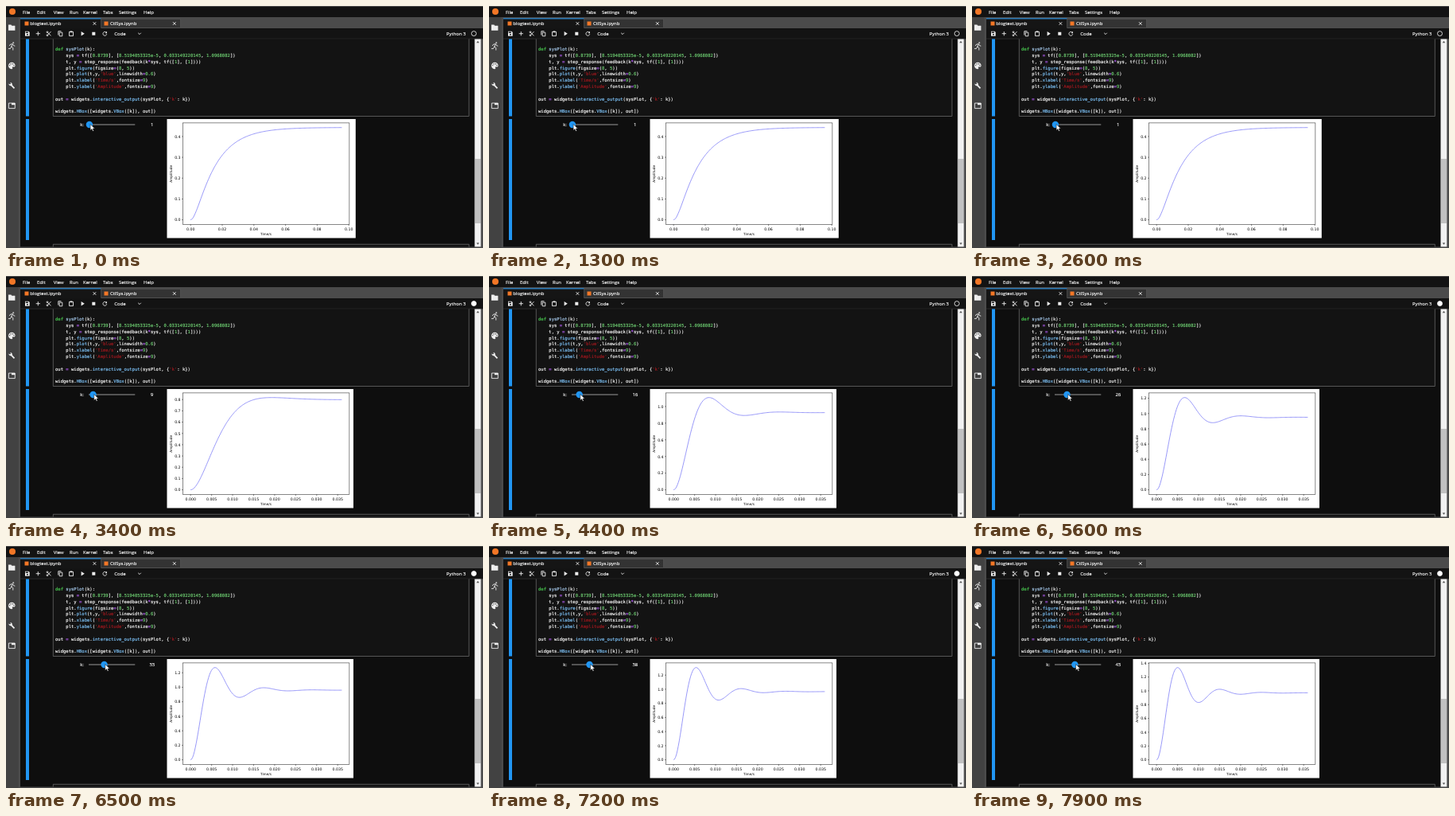
Animation of 600 by 304 pixels, one loop 8000 ms. Source, as an HTML page:

```html
<!DOCTYPE html>
<html lang="en">
<head>
<meta charset="utf-8">
<title>Step response slider</title>
<style>
  html, body { margin: 0; width: 100%; height: 100%; overflow: hidden; background: #111; }
  svg { display: block; width: 100%; height: 100%; }
  text { white-space: pre; fill: currentColor; }
  tspan { fill: currentColor; stroke: currentColor; }
  .ui { font: 5.95px "Open Sans", "Noto Sans", sans-serif; color: #fff; stroke: currentColor; stroke-width: .14; }
  .code { font: 5.545px "DejaVu Sans Mono", "Noto Sans Mono", monospace; color: #f4f4f4; stroke: currentColor; stroke-width: .17; }
  .kw { color: #3fa845; font-weight: bold; }
  .fn { color: #a9cdf0; }
  .prop { color: #7cc0f5; }
  .num { color: #6ccb70; }
  .str { color: #9c181e; }
  .op { color: #b05cf0; }
  .plot { font: 4.7px "DejaVu Sans", sans-serif; color: #000; }
  .label { font-size: 4.25px; }
  .mid { text-anchor: middle; }
  .end { text-anchor: end; }
  .icon { fill: #eee; stroke: none; }
  .line { fill: none; stroke: #eee; stroke-width: .9; }
</style>
</head>
<body>
<svg viewBox="0 0 600 304" preserveAspectRatio="none">
  <rect width="600" height="304" fill="#4b4b4b"/>
  <rect y="1" width="600" height="13" fill="#131313"/>
  <rect y="14" width="15.5" height="290" fill="#424242"/>
  <rect x="18" y="28" width="580" height="274.5" fill="#0e0e0e"/>
  <circle cx="8" cy="7" r="4" fill="#f37726"/>
  <g id="menu" class="ui"></g>

  <!-- side bar -->
  <path class="icon" d="M3 23.5h3.4l1 1.2h4v6H3z"/>
  <g class="line">
    <path d="M8.4 47.8L6.8 51l2 1.6v3M6.8 51L5.4 53.6H3M4.2 50l1.6-2 2.6-.2 1.3 2 1.6.4"/>
    <circle cx="9.2" cy="46.2" r=".6"/>
  </g>
  <path class="icon" d="M7.3 70.7a4.3 4.3 0 1 0 0 8.6c1 0 1.2-.9.7-1.5-.4-.8 0-1.3.8-1.3h1.1c1 0 1.7-.8 1.7-1.8 0-2.2-2-4-4.3-4z"/>
  <g fill="#424242">
    <circle cx="4.7" cy="74.6" r=".7"/><circle cx="6.1" cy="72.7" r=".7"/>
    <circle cx="8.4" cy="72.7" r=".7"/><circle cx="9.9" cy="74.6" r=".7"/>
  </g>
  <path d="M5.7 98.3l4.8 5" stroke="#eee" stroke-width="1.8" fill="none"/>
  <path class="icon" d="M3.4 97.4a2.6 2.6 0 0 0 4.3 2.2 2.6 2.6 0 0 0-2.6-3.6l1.2 1.3-1.2 1.2z"/>
  <path class="line" d="M3.4 122h7.9v6.6H3.4z"/>
  <path class="icon" d="M7 122h4.3v2.2H7z"/>

  <!-- document tabs -->
  <rect x="18" y="16" width="101.5" height="12.5" fill="#151515"/>
  <rect x="18" y="15.4" width="101.5" height="1" fill="#2196f3"/>
  <rect x="119.8" y="16.3" width="99.7" height="11.2" fill="#333" stroke="#616161" stroke-width=".5"/>
  <rect x="23.5" y="19.5" width="5" height="5" fill="#f37726"/>
  <rect x="123.5" y="19.5" width="5" height="5" fill="#f37726"/>
  <text class="ui" x="30.3" y="24.2">blogtest.ipynb</text>
  <text class="ui" x="131" y="24.2">CtlSys.ipynb</text>
  <path class="line" d="M109.6 20.2l3.6 3.6m0-3.6l-3.6 3.6M210 20.2l3.6 3.6m0-3.6l-3.6 3.6"/>

  <!-- toolbar -->
  <rect x="18" y="28" width="582" height="13.3" fill="#131313"/>
  <path d="M18 41.2h580" stroke="#3c3c3c" stroke-width=".6"/>
  <path class="icon" fill-rule="evenodd" d="M24 31.8h4.4l1.3 1.3v4.6H24zM24.7 32.4v1.5h3.2v-1.5zM26.9 35a.9.9 0 1 0 .01 0z"/>
  <path class="line" d="M37.7 34.7h5.2M40.3 32.1v5.2"/>
  <g class="line">
    <path d="M52.5 33.4l4 4M52.5 36.2l4-4"/>
    <circle cx="52" cy="32.8" r=".9"/><circle cx="52" cy="36.8" r=".9"/>
    <path d="M67.2 33.2h3.6v4.6h-3.6zM65.8 36.5v-4.8h3.6"/>
    <path d="M79.5 32.4h5v5.2h-5z"/>
  </g>
  <path class="icon" d="M80.7 31.4h2.6v1.8h-2.6zM94.6 32l4.2 2.7-4.2 2.7zM108.3 32.7h4v4h-4z"/>
  <path class="line" d="M126.2 33.3a2.4 2.4 0 1 0 .5 2"/>
  <path class="icon" d="M127 31.8v2.4h-2.4z"/>
  <text class="ui" x="136.3" y="36.7">Code</text>
  <path class="line" d="M166.2 33.8l1.8 1.8 1.8-1.8"/>
  <text class="ui" x="554" y="36.7">Python 3</text>
  <circle id="kernel" cx="588.5" cy="34.6" r="3" stroke="#fff" stroke-width=".8"/>

  <!-- cells -->
  <rect x="25" y="41.5" width="4" height="97" fill="#2196f3"/>
  <rect x="25" y="142" width="4" height="152" fill="#2196f3"/>
  <path d="M59.3 41.5V138.5H582.3V41.5" fill="#131313" stroke="#747474" stroke-width=".7"/>
  <path d="M59.3 302.5V299.3H582.3V302.5" fill="#131313" stroke="#747474" stroke-width=".7"/>
  <g id="code" class="code"></g>

  <!-- scroll bar -->
  <rect x="589.5" y="41.5" width="8" height="261" fill="#f1f1f1"/>
  <rect x="590" y="192" width="7" height="81" fill="#c1c1c1"/>
  <path d="M591.7 46.3l1.8-2.2 1.8 2.2zM591.7 297.5l1.8 2.2 1.8-2.2z" fill="#505050"/>

  <!-- output -->
  <text class="ui" x="93.2" y="151">k:</text>
  <path d="M104 149h58.3" stroke="#6b6b6b" stroke-width="1.5"/>
  <circle id="knob" cy="149" r="4.2" fill="#2196f3"/>
  <text id="value" class="ui mid" x="183.8" y="151.2"></text>
  <rect id="paper" x="202.5" y="142" height="149.5" fill="#fff"/>
  <g id="ticks" class="plot"></g>
  <path id="curve" fill="none" stroke="#7777f6" stroke-width=".75" stroke-linejoin="round"/>
  <rect x="222.7" y="146.9" width="209.2" height="127.5" fill="none" stroke="#111" stroke-width=".5"/>
  <text class="plot label mid" x="327" y="288">Time/s</text>
  <text class="plot label mid" transform="translate(208.6 210.8) rotate(-90)">Amplitude</text>
  <path id="cursor" d="M0 0v7.6l1.8-1.6 1.2 2.7 1.3-.6-1.2-2.6h2.4z" fill="#fff" stroke="#111" stroke-width=".5"/>
</svg>
<script>
const $ = id => document.getElementById(id);
const LOOP = 8000, STEP = 100;

// [ms, k]: the plot trails the slider a little
const sliderKeys = [[2700, 1], [3400, 9], [4400, 16], [5600, 26], [6500, 33], [7900, 43]];
const plotKeys = [[2750, 1], [3400, 5], [4400, 16], [5600, 24], [6500, 31], [7900, 41]];

const menu = { File: 21, Edit: 39, View: 59.7, Run: 80, Kernel: 97, Tabs: 122, Settings: 142, Help: 173 };
$('menu').innerHTML = Object.entries(menu)
  .map(([name, x]) => `<text x="${x}" y="9.7">${name}</text>`).join('');

const source = `def sysPlot(k):
    sys = tf([0.8739], [8.5194053325e-5, 0.033149220145, 1.0968082])
    t, y = step_response(feedback(k*sys, tf([1], [1])))
    plt.figure(figsize=(8, 5))
    plt.plot(t,y,'blue',linewidth=0.6)
    plt.xlabel('Time/s',fontsize=9)
    plt.ylabel('Amplitude',fontsize=9)

out = widgets.interactive_output(sysPlot, {'k': k})

widgets.HBox([widgets.VBox([k]), out])`;

const tokens = /(?<str>'[^']*')|(?<kw>\bdef\b)|(?<fn>(?<=def )\w+)|(?<prop>(?<=[a-z]\.)[A-Za-z]\w*)|(?<num>\b\d[\d.]*(?:e-\d+)?)|(?<op>[=*])/g;

function highlight(line) {
  return line.replace(tokens, (m, ...rest) => {
    const groups = rest[rest.length - 1];
    const kind = Object.keys(groups).find(g => groups[g] !== undefined);
    return `<tspan class="${kind}">${m}</tspan>`;
  });
}

$('code').innerHTML = source.split('\n')
  .map((line, i) => `<text x="62" y="${56.2 + i * 7.8}" xml:space="preserve">${highlight(line)}</text>`).join('');

function valueAt(keys, t) {
  if (t <= keys[0][0]) return keys[0][1];
  for (let i = 1; i < keys.length; i++) {
    const [t0, a] = keys[i - 1], [t1, b] = keys[i];
    if (t <= t1) return Math.round(a + (b - a) * (t - t0) / (t1 - t0));
  }
  return keys[keys.length - 1][1];
}

// Closed loop of gain k around 0.8739 / (a s^2 + b s + c)
function stepResponse(k) {
  const a = 8.5194053325e-5, b = 0.033149220145, gain = 0.8739 * k, stiff = 1.0968082 + gain;
  const decay = b / (2 * a), disc = decay * decay - stiff / a;
  const w = Math.sqrt(Math.abs(disc));
  const [c, s] = disc < 0 ? [Math.cos, Math.sin] : [Math.cosh, Math.sinh];
  const span = 7 / (disc < 0 ? decay : decay - w);
  const y = t => gain / stiff * (1 - Math.exp(-decay * t) * (c(w * t) + decay / w * s(w * t)));
  return { span, y };
}

// Smallest round step giving at most nine intervals
function tickStep(max) {
  const raw = max * 1.1 / 9, base = 10 ** Math.floor(Math.log10(raw));
  return base * [1, 2, 2.5, 5, 10].find(n => n * base >= raw - 1e-9);
}

function tickList(max) {
  const step = tickStep(max), list = [];
  for (let v = 0; v <= max * 1.05; v += step) list.push(v);
  return list;
}

function drawPlot(k) {
  const { span, y } = stepResponse(k), n = 160;
  const times = Array.from({ length: n + 1 }, (_, i) => span * i / n);
  const peak = Math.max(...times.map(y));
  const px = t => 232.2 + t / span * 190.2;
  const py = v => 268.6 - v / peak * 115.9;

  $('curve').setAttribute('d', 'M' + times.map(t => px(t).toFixed(2) + ' ' + py(y(t)).toFixed(2)).join('L'));
  const digits = tickStep(span) < 0.01 ? 3 : 2;
  const xTicks = tickList(span).map(t => `<path d="M${px(t)} 274.4v1.6" stroke="#111" stroke-width=".5"/>
    <text class="mid" x="${px(t)}" y="282">${t.toFixed(digits)}</text>`);
  const yTicks = tickList(peak).map(v => `<path d="M222.7 ${py(v)}h-1.6" stroke="#111" stroke-width=".5"/>
    <text class="end" x="219.6" y="${py(v) + 1.8}">${v.toFixed(1)}</text>`);
  $('ticks').innerHTML = xTicks.concat(yTicks).join('');
  $('paper').setAttribute('width', k === 1 ? 237.3 : 234.5);
}

let shownSlider, shownPlot;

function render(now) {
  const t = Math.floor(now % LOOP / STEP) * STEP;
  const k = valueAt(sliderKeys, t), plotK = valueAt(plotKeys, t);
  if (k !== shownSlider) {
    const x = 104.9 + (k - 1) * 0.583;
    $('knob').setAttribute('cx', x);
    $('value').textContent = k;
    $('cursor').setAttribute('transform', `translate(${x + 1.2} 148.6)`);
    shownSlider = k;
  }
  if (plotK !== shownPlot) drawPlot(shownPlot = plotK);
  // The kernel is busy while the plot is behind
  $('kernel').setAttribute('fill', k === plotK ? 'none' : '#fff');
}

const start = performance.now();
function tick() {
  render(performance.now() - start);
  requestAnimationFrame(tick);
}
tick();
</script>
</body>
</html>
```
